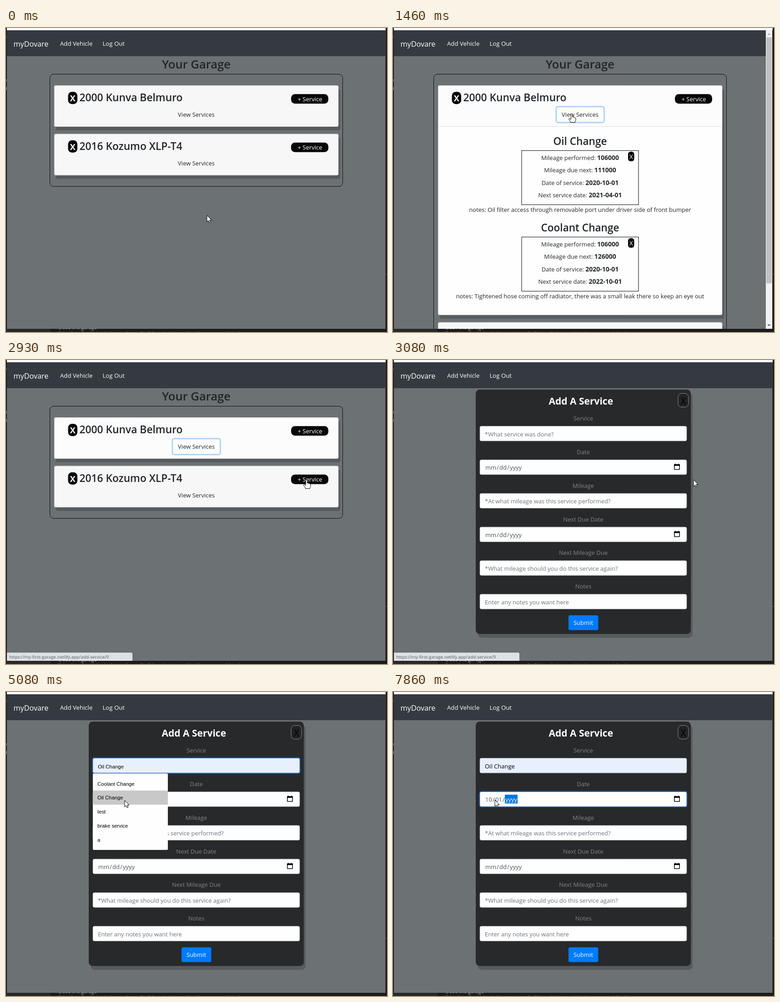
An HTML page for the animation above (8 s loop, 838 by 668 pixels).

```html
<!DOCTYPE html>
<html lang="en">
<head>
<meta charset="utf-8">
<title>Garage app</title>
<style>
html, body { margin: 0; width: 100%; height: 100%; overflow: hidden; background: #1b1b1c; }
svg { display: block; font-family: "Open Sans", "Noto Sans", sans-serif; }
#stage { width: 838px; height: 668px; }
.mid { text-anchor: middle; }
.semi { font-weight: 600; }
.bold { font-weight: 700; }
.menu { font-family: "Liberation Sans", Arial, sans-serif; }
</style>
</head>
<body>
<svg id="stage" viewBox="0 0 838 668"></svg>
<script>
const LOOP = 8000, INK = '#212529', PAGE = '#6c7173', SHADOW = '#585b5c';
const CENTER = 418.5, DETAILS_HEIGHT = 414;
const CARD = { x: 106, width: 625.2, header: 90.6, spacing: 106.6 };

// The screen refreshes in bursts: [first, last, count] in ms.
const refreshes = [
  [0, 0, 1], [300, 1300, 8], [1460, 1460, 1], [2050, 3080, 8], [3230, 4200, 8],
  [4350, 4500, 2], [4780, 5080, 3], [5400, 6250, 7], [7430, 7860, 4]
].flatMap(([first, last, count]) => Array.from({ length: count },
  (_, i) => Math.round(first + (last - first) * i / Math.max(1, count - 1))));

// Pointer stops: [ms, x, y]
const pointerStops = [
  [0, 442, 411.5], [220, 442, 411.5], [1000, 393, 188], [1900, 393, 188], [2190, 425, 217],
  [2780, 661, 263], [3080, 661, 263], [3920, 292, 164], [4200, 285, 164], [4500, 268, 198],
  [4650, 268, 198], [4930, 261, 244], [5080, 261, 238], [5260, 261, 238], [5960, 224, 237], [LOOP, 224, 237]
];
const ARROW = 'M0 0V14.5L3.3 11.6L5.5 16.4L7.8 15.4L5.7 10.7H10Z';
const HAND = 'M-1.7 1.5Q0-1.2 1.7 1.5V7.5Q3.6 6.6 4.6 8.2Q6.4 7.6 7.2 9.2Q9 9 9 11V14.5' +
  'Q8.6 16.8 7.3 18V19.5H-2.5V18L-6.3 12.6Q-6.6 10.6-4.4 10.8L-1.7 13Z';

const rect = (x, y, w, h, fill, attrs = '') =>
  `<rect x="${x}" y="${y}" width="${w}" height="${h}" fill="${fill}" ${attrs}/>`;
const text = (x, y, size, content, fill = INK, style = '') =>
  `<text x="${x}" y="${y}" font-size="${size}" fill="${fill}" class="${style}">${content}</text>`;
const path = (d, fill, attrs = '') => `<path d="${d}" fill="${fill}" ${attrs}/>`;

// CSS "ease", cubic-bezier(.25, .1, .25, 1)
function ease(x) {
  if (x <= 0) return 0;
  let low = 0, high = 1, s;
  for (let i = 0; i < 20; i++) {
    s = (low + high) / 2;
    if (.75 * s * (1 - s) + s ** 3 < x) low = s; else high = s;
  }
  const y = .3 * s * (1 - s) ** 2 + 3 * s * s * (1 - s) + s ** 3;
  return y > .995 ? 1 : y;
}

const detailsHeight = time =>
  DETAILS_HEIGHT * (ease((time - 1133) / 350) - ease((time - 1927) / 350));

function desktop() {
  return rect(0, 0, 838, 668, '#1b1b1c') + rect(0, 661, 98, 7, '#29292a') +
    ['e', 'o', 'u', 'r'].map((c, i) => text(-4.5, [23, 118, 136, 212][i], 11, c, '#aaa')).join('') +
    text(116, 661.5, 11, '(, see the garage', '#aaa') +
    text(113, 675, 11, 'if the list of vehicles is there, show all of them below and let the owner add to it', '#aaa') +
    rect(835, 541, 3, 1, '#555');
}

function navbar() {
  return rect(2, 0, 833, 5, '#fdfdfd') + rect(2, 5, 833, 57, '#343a40') +
    text(16.5, 40.5, 16.2, 'myDovare', '#fff') +
    text(119, 38.5, 13.2, 'Add Vehicle', '#fff') +
    text(212.5, 38.5, 13.2, 'Log Out', '#fff');
}

function service(y, title, mileage, nextMileage, nextDate, notes) {
  const mid = CENTER - CARD.x;
  const rows = [['Mileage performed', mileage], ['Mileage due next', nextMileage],
    ['Date of service', '2020-10-01'], ['Next service date', nextDate]];
  return text(mid, y + 40, 22.6, title, INK, 'mid semi') +
    rect(mid - 128.5, y + 52.5, 257, 119, 'none', 'stroke="#000"') +
    rows.map(([label, value], i) => text(mid, y + 73 + 27.5 * i, 13,
      `${label}: <tspan class="bold" font-size="14">${value}</tspan>`, INK, 'mid')).join('') +
    rect(mid + 105.5, y + 55, 13.5, 21, '#000', 'rx="5.5"') +
    text(mid + 112.3, y + 71, 14, 'X', '#fff', 'mid') +
    text(mid, y + 187, 13, 'notes: ' + notes, INK, 'mid');
}

function card(y, name, headerFill, height, focused) {
  const { x, width, header } = CARD;
  const details = height <= 0 ? '' :
    rect(x, y + header - .9, width, .9, '#dcdcdc') +
    `<svg x="${x}" y="${y + header}" width="${width}" height="${height}">` +
    service(0, 'Oil Change', 106000, 111000, '2021-04-01',
      'Oil filter access through removable port under driver side of front bumper') +
    service(190, 'Coolant Change', 106000, 126000, '2022-10-01',
      'Tightened hose coming off radiator, there was a small leak there so keep an eye out') + '</svg>';
  return rect(x + 4, y + 8, width, header + height, SHADOW, 'rx="4"') +
    rect(x, y, width, header + height, '#fefefe', 'rx="3.5"') +
    rect(x, y, width, header, headerFill, 'rx="3.5"') + details +
    rect(x + .45, y + .45, width - .9, header + height - .9, 'none',
      'rx="3" stroke="#000" stroke-opacity=".125" stroke-width=".9"') +
    rect(136.5, y + 14, 20.5, 27, '#080808', 'rx="8.5"') +
    text(146.8, y + 35, 22.6, 'x', '#fff', 'mid semi') +
    text(161.5, y + 35, 22.8, name, INK, 'semi') +
    rect(627, y + 19, 82, 21, '#080808', 'rx="8.5"') +
    text(668.5, y + 34.5, 13.1, '+ Service', '#fff', 'mid') +
    (focused ? rect(366, y + 46.5, 105.5, 35, '#fdfdfd', 'rx="4" stroke="#b0d4fb" stroke-width="3"') : '') +
    text(CENTER, y + 69, 13, 'View Services', INK, 'mid');
}

function scrollbar(height) {
  const thumb = 624 * 656 / (343 + height);
  return rect(820, 5, 14, 656, '#f1f1f1') + rect(821, 20.5, 12, thumb, '#c1c1c1') +
    path('M823.5 15L827 11.5L830.5 15Z', '#a3a3a3') + path('M823.5 651.5L827 655L830.5 651.5Z', '#505050');
}

function garage(time) {
  const height = detailsHeight(time), scrolls = 343 + height > 656;
  return `<g transform="translate(${scrolls ? -7 : 0})">` +
    text(CENTER, 89, 25.6, 'Your Garage', INK, 'mid semi') +
    rect(96.5, 101.5, 644, 246.5 + height, 'none', 'rx="8.5" stroke="#0c0c0c"') +
    card(126.2, '2000 Kunva Belmuro', time < 300 ? '#f7f7f7' : '#fcfcfc', height, time > 1120) +
    card(126.2 + CARD.spacing + height, '2016 Kozumo XLP-T4', '#f7f7f7', 0, false) + '</g>' +
    (scrolls ? scrollbar(height) : '');
}

// Segment widths follow their content: placeholders differ from digits.
function dateField(y, segments, active) {
  const widths = { mm: 26, dd: 18, yyyy: 28 };
  let x = 202, out = '';
  segments.forEach((value, i) => {
    const width = widths[value] || 17, on = i === active;
    if (on) out += rect(x, y + 6.5, width, 19.5, '#0078d7');
    out += text(x + width / 2, y + 22, 13, value, on ? '#fff' : '#495057', 'mid');
    x += width;
    if (i < 2) out += text(x + 2.5, y + 22, 13, '/', '#495057', 'mid');
    x += 5;
  });
  return out + rect(618.8, y + 10.7, 11.4, 10.6, 'none', 'rx=".8" stroke="#000" stroke-width="1.5"') +
    rect(618, y + 10, 13, 3.4, '#000') + rect(620, y + 8.5, 1.6, 2, '#000') + rect(627.4, y + 8.5, 1.6, 2, '#000');
}

function typedDate(time) {
  if (time < 7430) return [['mm', 'dd', 'yyyy'], time >= 6200 ? 0 : -1];
  if (time < 7560) return [['01', 'dd', 'yyyy'], 0];
  if (time < 7700) return [['10', 'dd', 'yyyy'], 1];
  if (time < 7850) return [['10', '00', 'yyyy'], 1];
  return [['10', '01', 'yyyy'], 2];
}

function serviceValue(time) {
  if (time < 4350) return text(202, 167.5, 13, '*What service was done?', '#6c757d');
  if (time < 5400) return text(202, 167.5, 11.4, time < 4780 ? 'Coolant Change' : 'Oil Change', '#000', 'menu');
  return text(202, 167.5, 13, 'Oil Change', '#000');
}

function suggestions(time) {
  const hovered = time < 4350 ? -1 : time < 4780 ? 0 : 1;
  return rect(191, 179, 165, 168, '#fefefe', 'rx="2"') +
    (hovered < 0 ? '' : rect(191, 185.5 + 31 * hovered, 165, 31, '#c8c8c8')) +
    ['Coolant Change', 'Oil Change', 'test', 'brake service', 'a'].map((item, i) =>
      text(201, 205.5 + 30.9 * i, 11.3, item, '#000', 'menu')).join('');
}

function form(time) {
  const focus = time < 3900 ? -1 : time < 6200 ? 0 : 1;
  const fields = [
    ['Service', () => serviceValue(time)],
    ['Date', y => dateField(y, ...typedDate(time))],
    ['Mileage', '*At what mileage was this service performed?'],
    ['Next Due Date', y => dateField(y, ['mm', 'dd', 'yyyy'], -1)],
    ['Next Mileage Due', '*What mileage should you do this service again?'],
    ['Notes', 'Enter any notes you want here']
  ];
  const body = fields.map(([label, content], i) => {
    const y = 145.3 + 73.85 * i, on = i === focus;
    const fill = i === 0 && time >= 4350 ? '#e8f0fe' : '#fefefe';
    return text(CENTER, y - 12.3, 13, label, '#828485', 'mid') +
      (on ? rect(188.3, y - 2.7, 460.4, 38, '#1e3f63', 'rx="5.5"') : '') +
      rect(191.2, y + .3, 454.6, 32.2, fill, `rx="3" stroke="${on ? '#80bdff' : '#ced4da'}" stroke-width=".9"`) +
      (typeof content === 'string' ? text(202, y + 22.2, 13, content, '#6c757d') : content(y));
  }).join('');
  return rect(186.5, 73, 472.5, 537.5, SHADOW, 'rx="8.5"') +
    rect(182, 65, 473, 537, '#28292a', 'rx="8.5"') +
    text(CENTER - 5.2, 97.5, 21, 'Add A Service', '#fff', 'mid bold') +
    rect(627, 73.5, 23, 30, '#222324', 'rx="8" stroke="#8a8b8c"') +
    text(638.5, 97.5, 21, 'X', '#000', 'mid') + body +
    rect(386, 561, 65.5, 32.5, '#007bff', 'rx="3.5"') +
    text(CENTER, 582, 13, 'Submit', '#fff', 'mid') +
    (time >= 4050 && time < 5400 ? suggestions(time) : '');
}

function statusBar() {
  return path('M2 643H275Q278 643 278 646V661H2Z', '#dee1e4') +
    text(7, 656, 9.85, 'https://my-first-garage.netlify.app/add-service/9', '#55585c');
}

function pointer(time) {
  const next = Math.max(1, pointerStops.findIndex(([at]) => at > time));
  const [t0, x0, y0] = pointerStops[next - 1], [t1, x1, y1] = pointerStops[next];
  const p = (time - t0) / (t1 - t0), k = p * p * (3 - 2 * p);
  const overLink = time > 940 && time < 2250 || time > 2700 && time < 3000;
  return path(overLink ? HAND : ARROW, '#fff', 'stroke="#000" stroke-linejoin="round" ' +
    `transform="translate(${x0 + (x1 - x0) * k} ${y0 + (y1 - y0) * k})"`);
}

function screen(time) {
  return desktop() + '<svg width="835" height="661">' +
    rect(2, 62, 833, 599, PAGE) + navbar() +
    (time < 3000 ? garage(time) : form(time)) +
    (time > 2700 && time < 3200 ? statusBar() : '') +
    rect(834, 5, 1, 656, '#4a4d4f') + '</svg>' + pointer(time);
}

const stage = document.getElementById('stage');
let shown = -1;
function tick() {
  const now = performance.now() % LOOP;
  const time = refreshes.findLast(at => at <= now);
  if (time !== shown) {
    stage.innerHTML = screen(time);
    shown = time;
  }
  requestAnimationFrame(tick);
}
tick();
</script>
</body>
</html>
```
